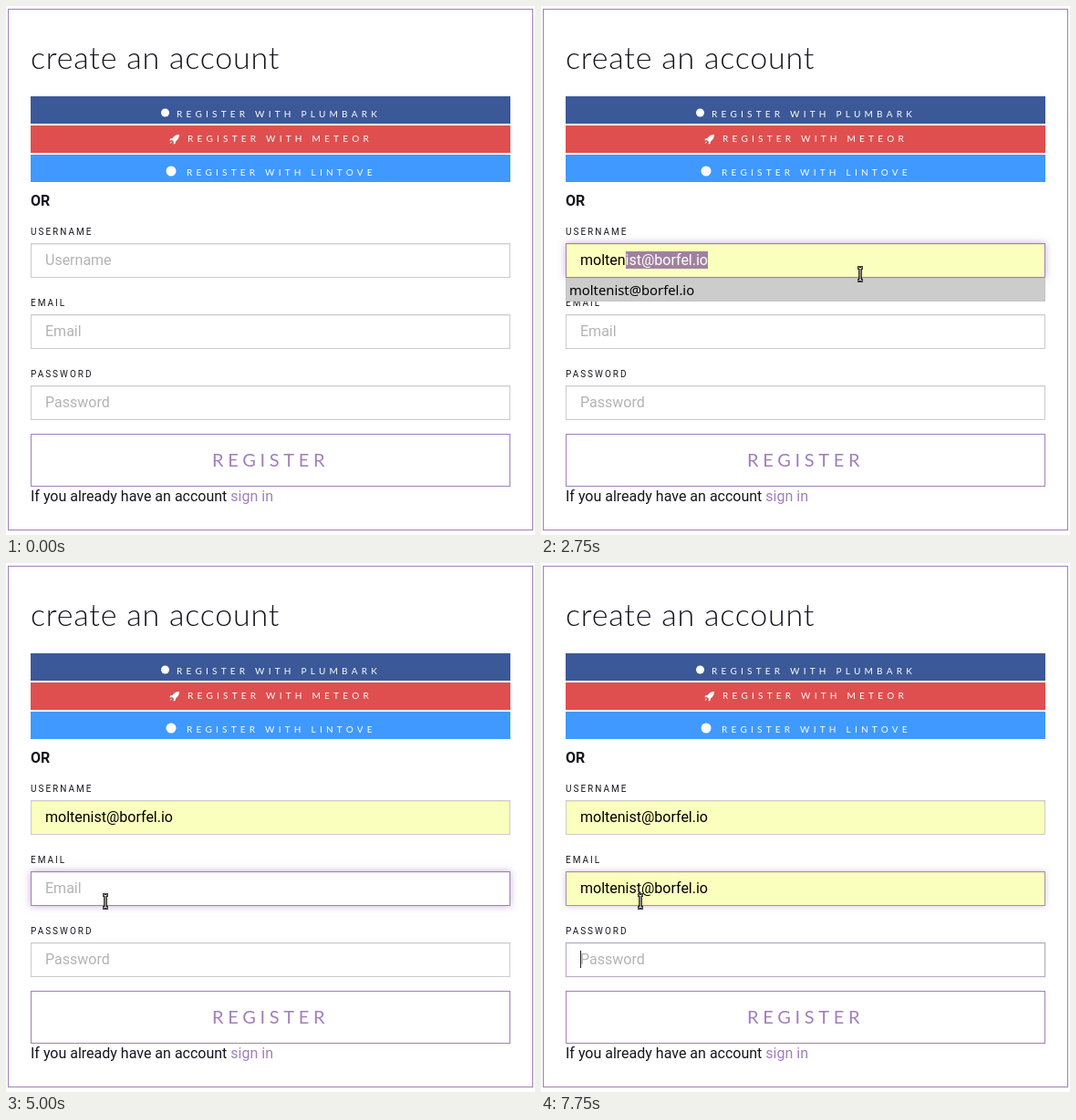
Animation of 580x580 px, one loop 8000 ms. Source, as an HTML page:

```html
<!DOCTYPE html>
<html lang="en">
<head>
<meta charset="utf-8">
<title>Create an account</title>
<style>
  html, body { margin: 0; width: 100%; height: 100%; overflow: hidden; background: #fff; }
  #stage { position: relative; width: 580px; height: 580px; overflow: hidden; font: 16px Roboto, sans-serif; }
  svg { position: absolute; left: 0; top: 0; display: block; }
  .ui { font-family: Lato, sans-serif; }
  .label { font-size: 10px; letter-spacing: 2px; }
  .social { font-size: 10px; letter-spacing: 4.25px; fill: #fff; }
  .field {
    position: absolute; left: 27px; width: 526px; height: 38px; box-sizing: border-box;
    padding-left: 15px; border: 1px solid #ccc; background: #fff; color: #555;
    line-height: 36px; white-space: pre; box-shadow: inset 0 1px 1px rgba(0,0,0,.075);
  }
  .field.half { border-color: #b9a9c5; box-shadow: inset 0 1px 1px rgba(0,0,0,.075), 0 0 2px rgba(161,127,185,.3); }
  .field.fade { border-color: #a78fb6; box-shadow: inset 0 1px 1px rgba(0,0,0,.075), 0 0 6px rgba(161,127,185,.5); }
  .field.focus { border-color: #a17fb9; box-shadow: inset 0 1px 1px rgba(0,0,0,.075), 0 0 8px rgba(161,127,185,.6); }
  .field.auto { background: #faffbd; color: #000; }
  .hint { color: #b3b3b3; }
  .sel { background: #a0819f; color: #fff; }
  .caret { display: inline-block; width: 1px; height: 19px; margin-right: -1px; vertical-align: -4px; background: #222; }
  #list {
    position: absolute; left: 27px; width: 526px; height: 26px; box-sizing: border-box;
    padding-left: 3px; border: 1px solid #c4c4c4; background: #fff; color: #000;
    font: 500 14.8px/24px "Noto Sans", sans-serif; white-space: pre;
  }
  #list.on { background: #ccc; }
</style>
</head>
<body>
<div id="stage">
  <svg width="580" height="580" fill="#15151f">
    <g fill="none" stroke="#a17fb9">
      <rect x="2.5" y="3.5" width="575" height="571"/>
      <rect x="27.5" y="469.5" width="525" height="57"/>
    </g>
    <text class="ui" x="27" y="69" font-size="34" font-weight="300" letter-spacing=".8">create an account</text>

    <rect x="27" y="99" width="526" height="30" fill="#3b5998"/>
    <rect x="27" y="131" width="526" height="30" fill="#df4f4f"/>
    <rect x="27" y="163" width="526" height="30" fill="#4099ff"/>
    <g fill="#fff">
      <circle cx="174.500" cy="117" r="4.500"/>
      <path d="M190 141q-5 0-7.500 4l-2.500.500-.500 2 2.500-.500 2 2-.500 2.500 2-.500.500-2.500q4-2.500 4-7.500zM181 148.500l-1.500 2.500 2.500-1.500z"/>
      <circle cx="181" cy="181" r="5.500"/>
    </g>
    <g class="ui social">
      <text x="187" y="122">REGISTER WITH PLUMBARK</text>
      <text x="199" y="149">REGISTER WITH METEOR</text>
      <text x="198" y="186">REGISTER WITH LINTOVE</text>
    </g>

    <text x="27" y="219" font-weight="700">OR</text>
    <g class="label">
      <text x="27" y="251">USERNAME</text>
      <text x="27" y="329">EMAIL</text>
      <text x="27" y="407">PASSWORD</text>
    </g>
    <text class="ui" x="226" y="505" font-size="20" letter-spacing="4.700" fill="#a17fb9">REGISTER</text>
    <text x="27" y="543">If you already have an account <tspan fill="#a17fb9">sign in</tspan></text>
  </svg>

  <div id="fields"></div>
  <div id="list"></div>

  <svg width="580" height="580">
    <g id="arrow">
      <path d="M.7.700V16.500L4.400 13 7 19.300 9.800 18.100 7.200 12H12.200Z" fill="#fff" stroke="#000" stroke-width="1.200"/>
    </g>
    <g id="beam" fill="none">
      <path id="bar" d="M-3-7H-1L0-6 1-7H3M-3 7H-1L0 6 1 7H3M0-6V6" stroke="#000" stroke-width="3"/>
      <use href="#bar" style="stroke:#fff"/>
      <path d="M-2.500-7H-1L0-6 1-7H2.500M-2.500 7H-1L0 6 1 7H2.500M0-6V6" stroke="#fff"/>
    </g>
  </svg>
</div>

<script>
const LOOP = 8000;
const EMAIL = 'moltenist@borfel.io';
const HINTS = ['Username', 'Email', 'Password'];
const $ = id => document.getElementById(id);

// Pointer: [time, shape, x, y]
const POINTER = [
  [0, '', 0, 0],
  [500, 'arrow', 546, 258],
  [750, 'beam', 375, 286],
  [1000, 'beam', 368, 286],
  [2750, 'beam', 350, 294],
  [3000, 'arrow', 262, 325],
  [3250, 'arrow', 182, 308],
  [3750, 'arrow', 156, 330],
  [4000, 'beam', 109, 371]
];

// Form: [time, focused field, typed letters, flags]
// c caret, l list, p list entry previewed, a entry accepted, h focus just starting
const FORM = [
  [0, -1, 0, ''],
  [1000, 0, 0, 'ch'],
  [1250, 0, 3, 'cl'],
  [1500, 0, 6, 'cl'],
  [2000, 0, 6, 'l'],
  [2250, 0, 6, 'lp'],
  [3000, 0, 6, 'cl'],
  [3250, 0, 6, 'lp'],
  [3500, 0, 0, 'ca'],
  [4000, 0, 0, 'a'],
  [4250, 1, 0, 'c'],
  [5000, 1, 0, ''],
  [5500, 1, 1, 'cl'],
  [5750, 1, 3, 'cl'],
  [6000, 1, 6, 'cl'],
  [6250, 1, 7, 'cl'],
  [6500, 1, 9, 'cl'],
  [7000, 1, 9, 'l'],
  [7250, 1, 9, 'lp'],
  [7500, 1, 0, 'ca'],
  [7750, 2, 0, 'ch']
];

const fields = HINTS.map((_, i) => {
  const el = document.createElement('div');
  el.style.top = 260 + 78 * i + 'px';
  return $('fields').appendChild(el);
});
$('list').textContent = EMAIL;

const span = (cls, text = '') => `<span class="${cls}">${text}</span>`;
const stepAt = (steps, t) => steps.findLast(s => s[0] <= t);

function drawForm([, active, typed, flags]) {
  const has = f => flags.includes(f);
  fields.forEach((el, i) => {
    const here = i === active;
    const done = i < active || here && has('a');
    const preview = here && has('p');
    const caret = here && has('c') ? span('caret') : '';
    const text = done ? EMAIL : here ? EMAIL.slice(0, typed) : '';
    const rest = preview ? span('sel', EMAIL.slice(typed)) : '';

    el.className = 'field';
    if (here) el.classList.add(has('h') ? 'half' : 'focus');
    else if (has('h') && i === active - 1) el.classList.add('fade');
    if (done || preview) el.classList.add('auto');
    el.innerHTML = text + rest + caret + (text ? '' : span('hint', HINTS[i]));
  });
  const list = $('list');
  list.style.display = has('l') ? 'block' : 'none';
  list.style.top = 298 + 78 * active + 'px';
  list.className = has('p') ? 'on' : '';
}

function drawPointer([, shape, x, y]) {
  for (const id of ['arrow', 'beam']) {
    $(id).style.display = id === shape ? '' : 'none';
    $(id).setAttribute('transform', `translate(${x} ${y})`);
  }
}

const start = performance.now();
let form, pointer;

function tick() {
  const t = (performance.now() - start) % LOOP;
  const nextForm = stepAt(FORM, t);
  const nextPointer = stepAt(POINTER, t);
  if (nextForm !== form) drawForm(form = nextForm);
  if (nextPointer !== pointer) drawPointer(pointer = nextPointer);
  requestAnimationFrame(tick);
}
tick();
</script>
</body>
</html>
```
